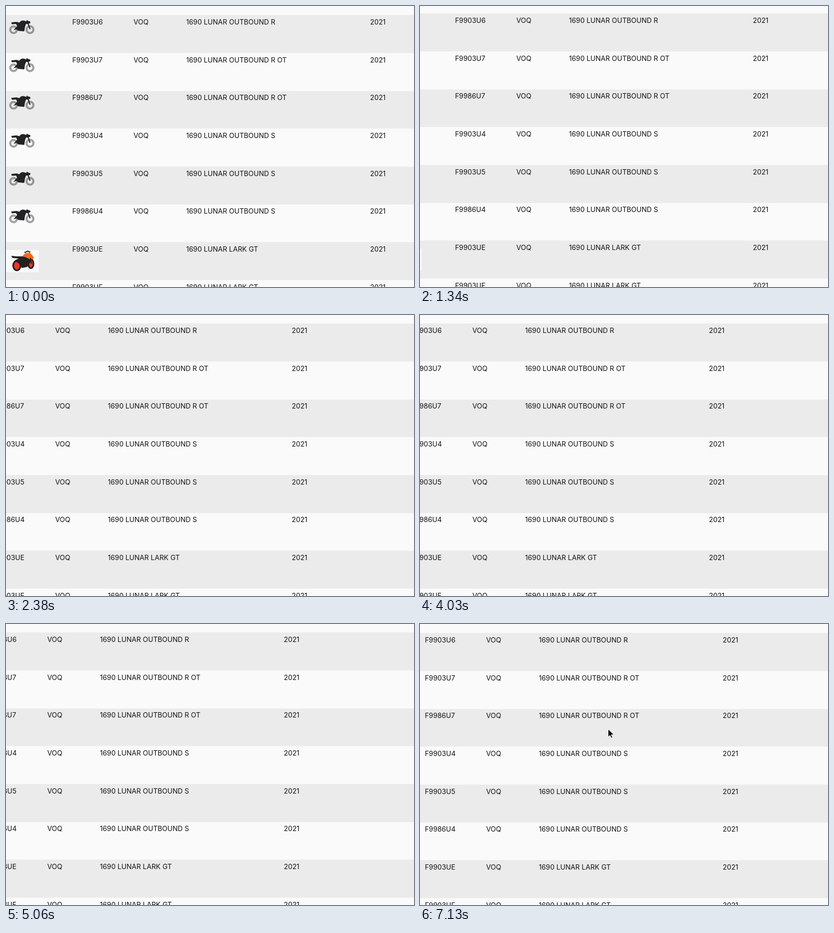
Recreate the animation shown at these times as an HTML page. Size 771 by 532 pixels, loop 8 s.

```html
<!DOCTYPE html>
<html lang="en">
<head>
<meta charset="utf-8">
<title>Vehicle list</title>
<style>
  html, body { margin: 0; width: 100%; height: 100%; overflow: hidden; background: #fafafa; }
  svg { display: block; }
  text { font: 13px Inter, sans-serif; fill: #111; }
</style>
</head>
<body>
<svg width="771" height="532" viewBox="0 0 771 532">
  <defs>
    <g id="bike">
      <g fill="none" stroke="#000" stroke-opacity=".36" stroke-width="4">
        <circle cx="14.3" cy="28" r="6.3"/>
        <circle cx="45.3" cy="27.7" r="6.5"/>
      </g>
      <path fill="#222225" d="M10 14L20 13 25 14.5 28 11.5Q33 9.5 37 12L41 11 46 12.5V15.5L41 17 38 17 36 22 34.5 31 23 30 20 27 14 29 21 21 19 17 11 17.5Z"/>
      <path fill="none" stroke="#222225" stroke-width="2.2" d="M39.5 10L45.5 27"/>
    </g>
    <g id="photo">
      <rect x="-2" y="15" width="64" height="42" rx="2" fill="#fafafa"/>
      <g fill="#e8372a" stroke="#222" stroke-width="3">
        <ellipse cx="20.5" cy="44.5" rx="7" ry="9"/>
        <ellipse cx="47" cy="41" rx="5" ry="8.5"/>
      </g>
      <path fill="#25211f" d="M10 26L20 27 32 27 46 30 46 38 40 47 30 49 25 41 16 35 24 31 12 30Z"/>
      <path fill="#f26a1b" d="M31 26L37 21 45 20 50 25 53 31 46 33 38 29Z"/>
      <path fill="none" stroke="#25211f" stroke-width="2" d="M35 20L41 17 46 19M46 30L48 41"/>
    </g>
  </defs>
  <g id="bands" fill="#ebebeb"></g>
  <g id="cells"></g>
  <path id="cursor" stroke="#fff" d="M0 0V15L3.5 11.8 5.8 17 8.3 15.9 6 10.8H11Z"/>
</svg>
<script>
const LOOP = 8000, START = 300, STEP = 148.5, PITCH = 215 / 3;
const ROUTE = '1690 LUNAR OUTBOUND ', ROAD = '1690 LUNAR LARK GT';
const rows = [
  ['F9903U6', ROUTE + 'R'], ['F9903U7', ROUTE + 'R OT'], ['F9986U7', ROUTE + 'R OT'],
  ['F9903U4', ROUTE + 'S'], ['F9903U5', ROUTE + 'S'], ['F9986U4', ROUTE + 'S'],
  ['F9903UE', ROAD], ['F9903UF', ROAD]
];
// Turning points of the drag: step, x, y
const drag = [
  [0, 0, 0], [4, -23, -1], [8, -59, -3], [10, -86, -4], [12, -86, -4], [15, -148, -1],
  [25, -148, -1], [26, -142, -1], [27, -123, -1], [28, -123, -1], [33, -163, -1],
  [37, -163, -1], [41, -116, 0]
];

const el = id => document.getElementById(id);
const bands = el('bands'), cells = el('cells'), cursor = el('cursor');
const rowTop = i => Math.round(17.2 + i * PITCH);

rows.forEach(([code, model], i) => {
  const shift = Math.round(i * PITCH);
  if (i % 2 === 0) {
    bands.innerHTML += `<rect y="${rowTop(i)}" width="771" height="${rowTop(i + 1) - rowTop(i)}"/>`;
  }
  const columns = [[125.2, code], [241, 'VOQ'], [340.5, model], [688, '2021']];
  cells.innerHTML += `<use href="#${i < 6 ? 'bike' : 'photo'}" y="${17 + shift}"/>` +
    columns.map(([x, label]) => `<text x="${x}" y="${35 + shift}">${label}</text>`).join('');
});

function dragAt(step) {
  const next = drag.findIndex(key => key[0] > step);
  if (next < 0) return drag.at(-1).slice(1);
  const [n0, x0, y0] = drag[next - 1], [n1, x1, y1] = drag[next];
  const p = (step - n0) / (n1 - n0);
  return [x0 + (x1 - x0) * p, y0 + (y1 - y0) * p].map(Math.round);
}

const move = (node, x, y) => node.setAttribute('transform', `translate(${x} ${y})`);

function draw() {
  const step = Math.floor((performance.now() % LOOP - START) / STEP) + 1;
  const [x, y] = dragAt(Math.max(0, step));
  move(bands, 0, y);
  move(cells, x, y);
  // The pointer glides in for the last three steps, then rests
  const glide = Math.min(1, (step - 44) / 3);
  cursor.style.display = glide < 0 ? 'none' : '';
  move(cursor, 355.5, 48 + 151 * glide);
  requestAnimationFrame(draw);
}
draw();
</script>
</body>
</html>
```
